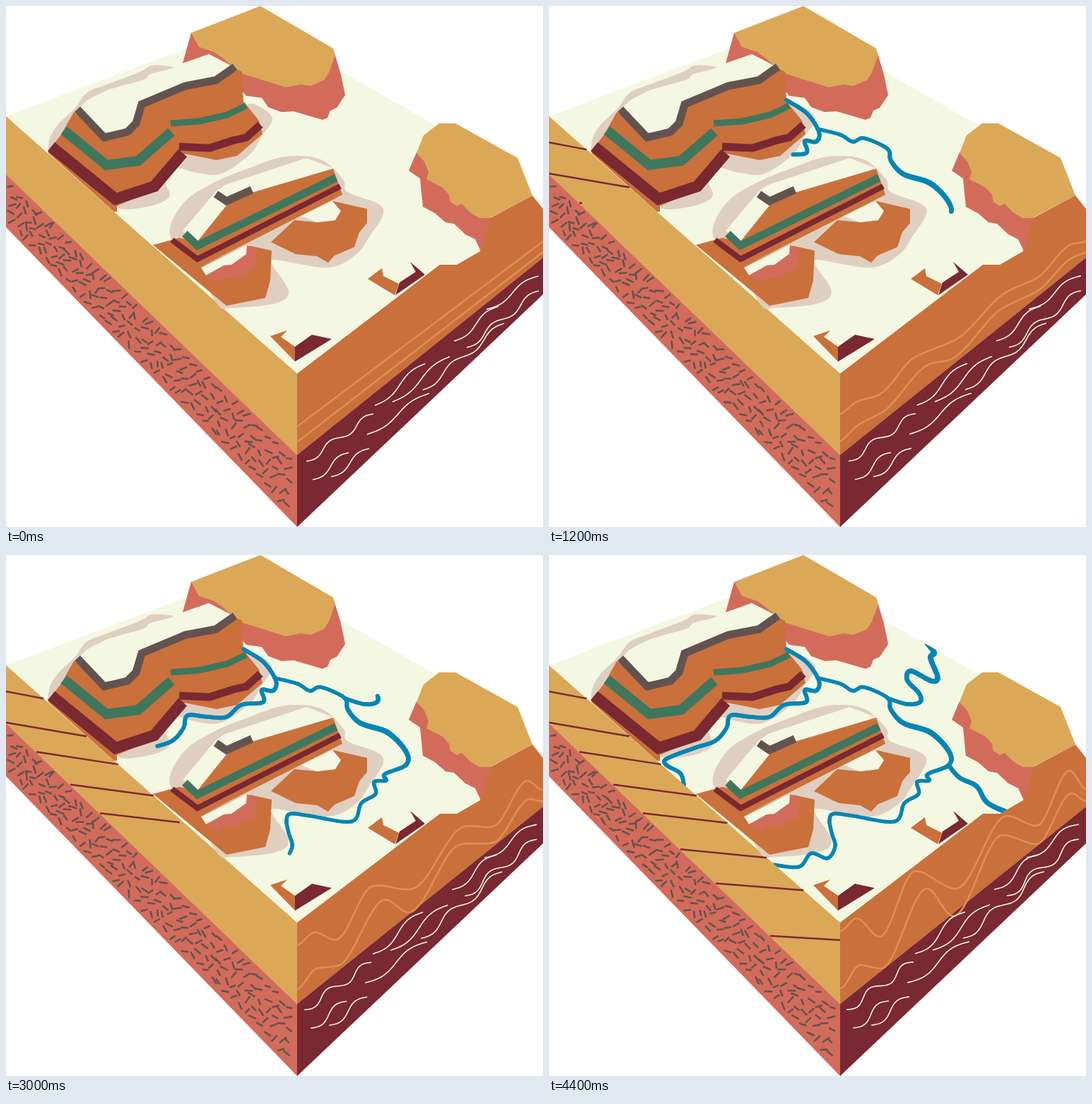
Write an HTML page with a canvas that moves like this. It is 760 by 737 pixels and loops after 4900 ms.

```html
<!DOCTYPE html>
<html lang="en">
<head>
<meta charset="utf-8">
<title>Terrain block</title>
<style>
html, body { margin: 0; width: 100%; height: 100%; overflow: hidden; background: #fff; }
canvas { display: block; }
</style>
</head>
<body>
<canvas id="stage" width="760" height="737"></canvas>
<script>
(() => {
const ctx = document.getElementById('stage').getContext('2d');
const LOOP = 4900, STEP = 200, LAST = 22;
const cream = '#f4f7e2', gold = '#dba858', orange = '#ca703b', red = '#d36b5b',
  maroon = '#7a2831', green = '#3e775e', gray = '#635350', beige = '#dfcfc0',
  tan = '#de9050', blue = '#0585b5';

const parse = s => s.trim().split(/\s+/).map(p => p.split(',').map(Number));
const lerp = (a, b, k) => a + (b - a) * k;
const ease = k => k * k * (3 - 2 * k);

// Value at x on a line through [x, y] points
function along(pts, x, curve = k => k) {
  let i = 1;
  while (i < pts.length - 1 && x > pts[i][0]) i++;
  const [x0, y0] = pts[i - 1], [x1, y1] = pts[i];
  return lerp(y0, y1, curve((x - x0) / (x1 - x0)));
}

// Catmull-Rom samples, SUB per span
const SUB = 8;
function smooth(pts, closed) {
  const n = pts.length, out = [];
  const at = i => closed ? pts[(i + n) % n] : pts[Math.max(0, Math.min(n - 1, i))];
  const spans = closed ? n : n - 1;
  for (let i = 0; i < spans; i++) {
    const [a, b, c, d] = [at(i - 1), at(i), at(i + 1), at(i + 2)];
    for (let j = 0; j < SUB; j++) {
      const u = j / SUB;
      out.push([0, 1].map(k => 0.5 * (2 * b[k] + (c[k] - a[k]) * u +
        (2 * a[k] - 5 * b[k] + 4 * c[k] - d[k]) * u * u +
        (3 * b[k] - a[k] - 3 * c[k] + d[k]) * u * u * u)));
    }
  }
  if (!closed) out.push(pts[n - 1]);
  return out;
}

function trace(pts) {
  ctx.beginPath();
  pts.forEach(([x, y], i) => i ? ctx.lineTo(x, y) : ctx.moveTo(x, y));
}
function fill(color, pts) {
  trace(pts);
  ctx.closePath();
  ctx.fillStyle = color;
  ctx.fill();
}
function stroke(color, width, pts) {
  trace(pts);
  ctx.strokeStyle = color;
  ctx.lineWidth = width;
  ctx.stroke();
}

// Static parts, each a function that paints itself
const shape = (color, s) => { const p = parse(s); return () => fill(color, p); };
const blob = (color, s) => { const p = smooth(parse(s), true); return () => fill(color, p); };
const band = (color, width, s) => { const p = parse(s); return () => stroke(color, width, p); };

const ground = parse('0,156 255,60 470,90 605,167 745,268 685,300 671,347 638,366 614,366 412,520');

const block = [
  () => fill(cream, ground),
  shape(gold, '0,156 412,520 412,635 0,238'),
  shape(red, '0,238 412,635 412,737 0,313'),
  shape(orange, '412,520 614,366 638,366 671,347 685,300 745,268 760,287 760,356 412,635'),
  shape(maroon, '412,635 760,356 760,408 412,737')
];

const mesas = [
  shape(red, '262,38 250,81 287,68 330,90 334,120 340,127 362,130 371,143 390,150 407,149 448,161 455,158 459,148 468,144 480,126 474,97 466,70'),
  shape(gold, '262,38 360,0 463,60 466,69 457,94 450,105 431,113 417,111 396,115 361,104 332,95 306,73 294,65 273,58'),
  shape(red, '581,207 570,233 586,244 590,284 607,293 622,306 634,308 650,323 664,330 672,347 686,298 640,240'),
  shape(gold, '591,183 613,166 636,166 724,215 745,268 684,300 670,300 657,292 645,280 638,283 629,277 627,267 618,257 595,245 598,235 592,220 581,208')
];

const largeHill = [
  blob(beige, '62,207 62,187 74,167 97,145 114,123 140,112 190,93 207,84 237,87 205,96 195,104 160,114 137,122 107,141 90,180'),
  blob(beige, '335,141 360,143 377,160 362,184 345,210 305,237 270,236 238,229 226,248 231,270 200,284 158,283 200,230 270,180'),
  shape(orange, '96,150 138,180 175,174 190,140 252,110 293,104 328,90 334,93 336,135 358,162 363,181 327,212 298,218 253,209 213,258 157,283 157,291 153,291 60,208 60,205 78,182'),
  band(gray, 11, '101,146 139,186 172,178 184,166 192,139 254,113 297,105 324,86'),
  band(green, 14, '82,176 142,225 187,219 234,178'),
  band(green, 9, '233,166 274,163 313,154 340,141'),
  band(maroon, 16, '64,199 155,273 210,255 250,208'),
  band(maroon, 11, '245,199 288,201 322,190 340,186 360,168')
];

const smallHill = [
  blob(beige, '232,325 250,280 290,252 342,230 395,213 445,217 477,245 483,263 525,279 534,294 515,325 495,352 455,370 380,359 378,368 400,404 380,421 320,427 300,423 270,370'),
  shape(cream, '297,262 310,253 425,215 464,230 350,266 312,282 271,333 250,318'),
  shape(orange, '313,281 348,264 463,230 476,267 275,369 340,338 376,346 374,388 367,413 312,424 208,338 245,328 271,333'),
  band(green, 11, '253,322 271,339 467,243'),
  band(maroon, 8, '235,331 271,358 473,255'),
  band(gray, 11, '297,266 312,276 348,260'),
  shape(cream, '276,370 340,338 345,338 341,352 320,367 283,381'),
  shape(red, '283,381 308,367 319,366 340,351 341,338 355,345 352,370 325,385 308,384 300,391'),
  shape(orange, '375,334 408,303 440,306 466,303 463,276 511,287 511,307 500,320 493,341 465,353 456,363 440,354 410,351'),
  shape(cream, '417,297 462,276 474,290 466,303 440,306')
];

const craters = [
  shape(orange, '374,467 398,459 389,468 409,482 409,503'),
  shape(maroon, '409,482 433,465 461,471 409,503'),
  shape(orange, '512,386 532,371 534,382 556,393 550,409'),
  shape(maroon, '551,409 557,391 580,376 572,362 593,380')
];

const scene = [...block, ...mesas, ...largeHill, ...smallHill, ...craters];

// Dashes in the lower left layer, on a jittered grid
let seed = 11;
const rand = () => (seed = (seed * 16807) % 2147483647) / 2147483647;
const spread = size => (rand() - 0.5) * size;
const dashes = Array.from({ length: 205 }, (_, i) => {
  const col = Math.floor(i / 5), row = i % 5;
  const x = 9 + col * 9.75 + spread(6);
  const depth = (row + 0.55 + (col % 2) * 0.2 + spread(0.35)) / 5.4;
  return {
    x,
    y: lerp(243 + x * 0.964, 308 + x * 1.029, depth),
    angle: -0.9 + rand() * 2.4,
    half: 4.5 + rand() * 1.8
  };
});

function drawDashes(step) {
  dashes.forEach(({ x, y, angle, half }, i) => {
    const a = angle + 0.1 * Math.sin(step * 1.3 + i);
    const dx = Math.cos(a) * half, dy = Math.sin(a) * half;
    stroke(gray, 2.6, [[x - dx, y - dy], [x + dx, y + dy]]);
  });
}

// Progress of the growing lines is given at these times
const beats = [200, 800, 1800, 2600, 3400, 3800, 4400];
const progress = (reach, time) =>
  time <= beats[0] ? 0 : Math.max(0, along(beats.map((b, i) => [b, reach[i]]), time));

// Seams run from the lower edge of the gold face to its upper edge, one after another
const seams = [0, 0, 43, 91, 133, 186, 236, 313].map((x, i) => {
  const y = i ? 237 + x * 0.964 : 193;
  const slope = lerp(0.19, 0.06, i / 7);
  const end = Math.min(412, (y - slope * x - 156) / (0.8835 - slope));
  return { x, y, slope, end };
});
const seamReach = [0, 1.39, 3, 4.34, 5.55, 6.54, 8];

function drawSeams(time) {
  const reach = progress(seamReach, time);
  seams.slice(0, Math.ceil(reach)).forEach(({ x, y, slope, end }, i) => {
    const tip = lerp(x, end, Math.min(1, reach - i));
    stroke(maroon, 2.5, [[x, y], [tip, y + slope * (tip - x)]]);
  });
}

// Strata bend from a straight line into waves through these crests and troughs
const folds = [
  { left: 595, right: 333, turns: parse('412,532 435,514 468,540 518,447 576,472 648,369 690,383 737,305 760,331') },
  { left: 617, right: 348, turns: parse('412,613 440,580 470,585 535,472 572,511 642,396 690,409 740,337 760,348') }
];

function drawFolds(k) {
  for (const { left, right, turns } of folds) {
    const pts = [];
    for (let x = 412; x <= 760; x += 3) {
      pts.push([x, lerp(lerp(left, right, (x - 412) / 348), along(turns, x, ease), k)]);
    }
    stroke(tan, 2.6, pts);
  }
}

// Ripples: end points of each wavy line
const ripples = [
  '425,644 520,577', '434,670 485,632', '460,666 514,626', '511,606 599,548', '522,565 593,506',
  '547,560 628,496', '590,543 705,449', '634,474 697,425', '652,483 754,403', '680,429 754,382'
].map(parse);

function drawRipples(k) {
  for (const [[x0, y0], [x1, y1]] of ripples) {
    const waves = Math.max(1, Math.round((x1 - x0) / 60));
    const pts = [];
    for (let u = 0; u <= 1.001; u += 0.04) {
      const s = (4.5 + 1.5 * k) * Math.sin(u * waves * 2 * Math.PI);
      pts.push([lerp(x0, x1, u) + s * 0.6 - 4 * k, lerp(y0, y1, u) + s * 0.8 - k]);
    }
    stroke(cream, 1.6, pts);
  }
}

// Rivers: bends, the bend reached at each beat, and width by bend
const rivers = [
  { bends: `336,133 365,152 382,178 378,192 362,191 364,208 333,212 312,229 285,229 257,227
      251,245 235,263 206,273 167,288 166,297 186,309 191,326`,
    reach: [0, 4, 8, 11, 12.4, 13, 16], width: () => 5.8 },
  { bends: `380,174 412,182 430,192 446,187 479,202 484,219 502,238 540,251 566,278 566,297
      536,310 538,319 521,321 523,338 503,351 489,377 430,369 403,366 397,375 400,393
      405,412 394,429 371,422 354,441 317,438`,
    reach: [-7, 5, 14, 19, 22, 23, 24], width: i => 5.2 + 2.5 * Math.exp(-(((i - 7) / 2) ** 2)) },
  { bends: '480,203 507,211 525,208 524,196 507,177 512,164 541,178 550,173 540,146 545,138 535,124',
    reach: [-2, -2, -2, 1, 4.6, 6, 10], width: i => 5.5 + i / 4 },
  { bends: '566,298 581,315 605,327 620,350 648,364',
    reach: [-2, -2, -2, -2, 0.1, 1, 4], width: i => 6 + i / 3 }
].map(r => ({ ...r, path: smooth(parse(r.bends)) }));

function drawRivers(time) {
  ctx.save();
  trace(ground);
  ctx.clip();
  ctx.lineCap = 'round';
  for (const { path, reach, width } of rivers) {
    const end = Math.round(progress(reach, time) * SUB);
    for (let i = 1; i <= end; i++) stroke(blue, width(i / SUB), [path[i - 1], path[i]]);
  }
  ctx.restore();
}

function draw(now) {
  const step = Math.min(LAST, Math.floor((now % LOOP) / STEP));
  const time = step * STEP, k = step / LAST;
  ctx.fillStyle = '#fff';
  ctx.fillRect(0, 0, 760, 737);
  scene.forEach(paint => paint());
  drawDashes(step);
  drawSeams(time);
  drawFolds(k);
  drawRipples(k);
  drawRivers(time);
}

const begin = performance.now();
function tick() {
  draw(performance.now() - begin);
  requestAnimationFrame(tick);
}
tick();
})();
</script>
</body>
</html>
```
